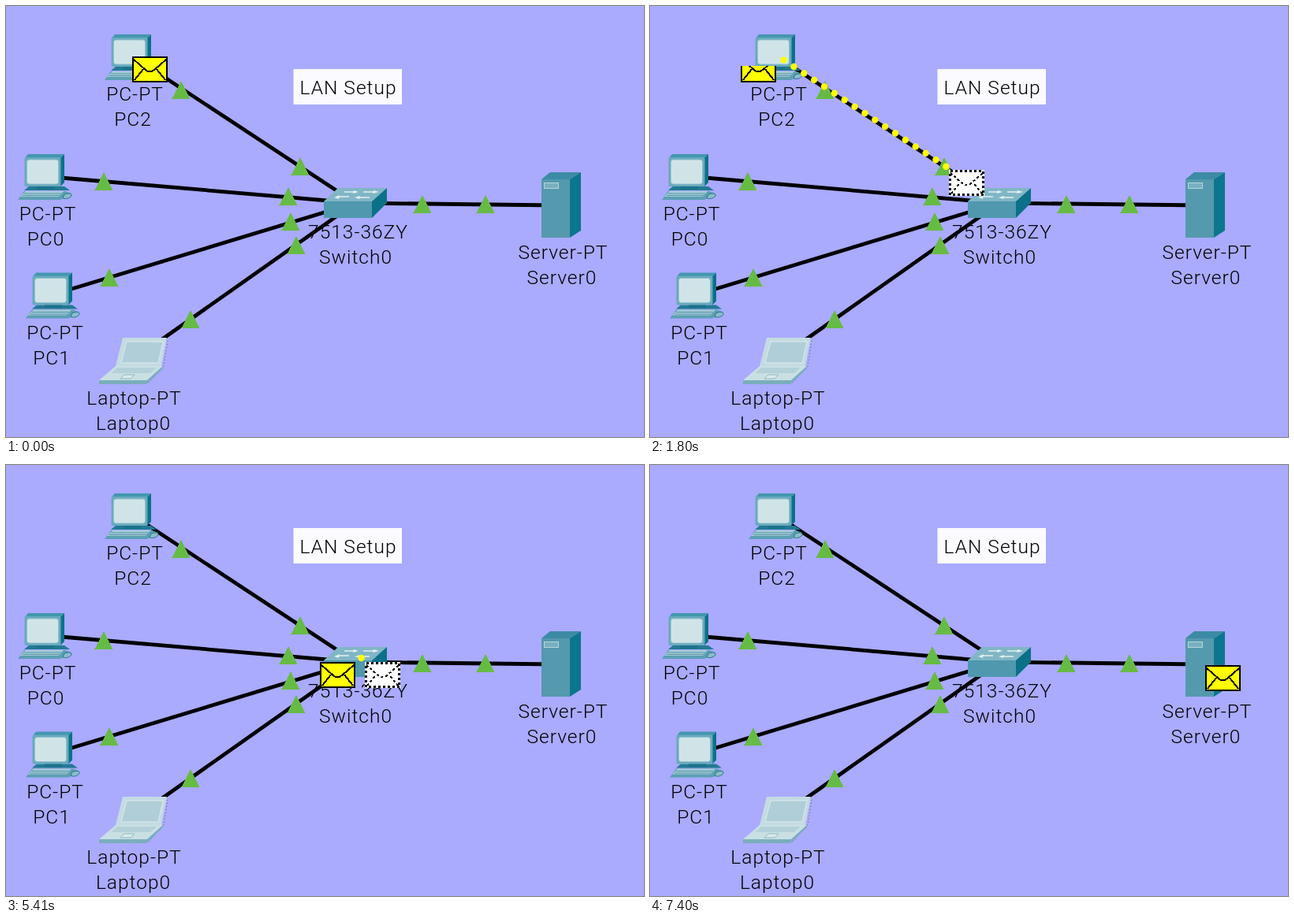
These frames come from a looping animation (809x547 px, 8 s). An HTML page:

```html
<!DOCTYPE html>
<html lang="en">
<head>
<meta charset="utf-8">
<title>LAN Setup</title>
<style>
  html, body { margin: 0; width: 100%; height: 100%; overflow: hidden; background: #aaaaff; }
  #stage { display: block; width: 809px; height: 547px; }
  text { font: 300 24.5px Roboto, "Open Sans", sans-serif; letter-spacing: 1px; text-anchor: middle; fill: #000; }
  .wire { stroke: #000; stroke-width: 4.8; }
  .led { fill: #66bb44; }
  .ink { fill: none; stroke: #000; stroke-width: 2; }
  .dash { stroke-dasharray: 3 3; }
  #leds, #mail, #ghost { shape-rendering: crispEdges; }
</style>
</head>
<body>
<svg id="stage" viewBox="0 0 809 547">
  <defs>
    <g id="pc">
      <path d="M14 41H59L66 46H8Z" fill="#227a92"/>
      <path d="M8 47H60L68 50L54 58H0Z" fill="#5c9fb3"/>
      <path d="M10 47H58L52 54H3Z" fill="#a5cad5"/>
      <path d="M8 50H55M6 52.500H53" stroke="#5496aa" fill="none"/>
      <path d="M59 51Q69 48 68 53Q64 58 57 56Z" fill="#8dbbc8" stroke="#28788e"/>
      <path d="M9 5L13 0H59L54 5Z" fill="#4397af"/>
      <path d="M54 5L59 0V36L54 41Z" fill="#0c7089"/>
      <rect x="8.500" y="4" width="46" height="37" rx="2" fill="#69aabd"/>
      <rect x="11.500" y="7" width="40" height="31" rx="3" fill="#d0e4e8" stroke="#91c0cd"/>
      <path d="M24 41H46V45H24Z" fill="#1c728a"/>
    </g>
    <path id="flap" d="M2 4L17 17Q22 22 28 17L43 4M3 30L14 16M42 30L31 16"/>
    <g id="mail">
      <rect x="1" y="1" width="43" height="31" fill="#ffff00" stroke="#000" stroke-width="2"/>
      <use href="#flap" class="ink"/>
    </g>
    <g id="ghost">
      <rect width="45" height="33" fill="#fff"/>
      <rect x="1.500" y="1.500" width="42" height="30" class="ink dash" style="stroke-width: 3"/>
      <use href="#flap" class="ink dash"/>
    </g>
  </defs>
  <rect width="809" height="547" fill="#aaaaff"/>
  <g id="wires"></g>

  <g id="labels"><rect x="364.500" y="80" width="137.500" height="45" fill="#fafaff"/></g>

  <use href="#pc" x="125" y="36"/>
  <use href="#pc" x="15" y="188"/>
  <use href="#pc" x="25" y="338.500"/>

  <g id="laptop">
    <path d="M148 421H204L197 457H139Z" fill="#c3dbe1"/>
    <path d="M153 426H199L193 453H146Z" fill="#b0ced8" stroke="#dcebed"/>
    <path d="M204 421L205 425L200 457L180 479" fill="none" stroke="#557" stroke-dasharray="1 3"/>
    <path d="M139 457H199L179 475H118Z" fill="#c9dfe3"/>
    <path d="M118 475H179L199 457V460L178 480H118Z" fill="#7aaebc"/>
    <path d="M141 459H191L183 466H133Z" fill="#b4d1d9"/>
    <path d="M150 468H163L158 473H145Z" fill="#d9e9ec" stroke="#8eb9c5"/>
  </g>

  <g id="switch">
    <path d="M403 248L421 231H483L464 248Z" fill="#80b6c5"/>
    <path d="M464 248L483 231V250L464 269Z" fill="#0b7088"/>
    <path d="M403 248H464V269H403Z" fill="#4f98ae"/>
    <path d="M429 236H443M421 242H435M453 236H468M447 243H461" stroke="#e4f0f3" stroke-width="1.500"/>
    <path d="M441 234L447 236L440 238ZM423 240L416 243L422 245ZM466 234L473 236L465 238ZM449 241L442 243L448 245Z" fill="#e4f0f3"/>
  </g>

  <g id="server">
    <path d="M679 220L690 211H729L715 220Z" fill="#3c8ba4"/>
    <path d="M715 220L729 211V285L715 294Z" fill="#0c768e"/>
    <path d="M679 220H715V294H679Z" fill="#5499ae"/>
    <rect x="682.500" y="224.500" width="18" height="7" fill="#78b0c0" stroke="#b5d5dd"/>
  </g>

  <g id="leds"></g>
  <g id="trail" fill="#ffff00"></g>
  <svg id="out" width="45"><use href="#mail"/></svg>
  <use id="moving" href="#ghost"/>
  <svg id="fill" width="45"><use href="#mail"/></svg>
</svg>
<script>
const $ = id => document.getElementById(id);

function add(parent, tag, attrs, text) {
  const el = document.createElementNS("http://www.w3.org/2000/svg", tag);
  set(el, attrs);
  if (text) el.textContent = text;
  return $(parent).appendChild(el);
}
function set(el, attrs) {
  for (const k in attrs) el.setAttribute(k, attrs[k]);
}
const show = (el, on) => set(el, { visibility: on ? "visible" : "hidden" });

for (const [x1, y1] of [[179, 76], [70, 218], [80, 360], [195, 425], [700, 253]])
  add("wires", "line", { class: "wire", x1, y1, x2: 443, y2: 250 });

for (const [x, y] of [[222, 107], [373, 204], [124, 223], [358, 242], [361, 274],
                      [131, 345], [368, 304], [234, 398], [528, 252], [608, 252]])
  add("leds", "path", { class: "led", d: `M${x} ${y - 11.5}l11.5 22h-23z` });

for (const [x, y, s] of [
  [434, 111.5, "LAN Setup"],
  [163.5, 120, "PC-PT"], [161, 152, "PC2"],
  [53, 272, "PC-PT"], [50.5, 304, "PC0"],
  [62.5, 422.5, "PC-PT"], [58, 454.5, "PC1"],
  [162.5, 506, "Laptop-PT"], [161.5, 538, "Laptop0"],
  [446.5, 294.5, "7513-36ZY"], [443.5, 326.5, "Switch0"],
  [706.5, 320.5, "Server-PT"], [705, 352.5, "Server0"]
]) add("labels", "text", { x, y }, s);

const LOOP = 8000, STEP = 66.7, HOPS = 22, H = 33;
const stops = [[160, 64], [443, 250], [704, 254]];
// start and end in ms, ticks per step, first trail dot
const trips = [
  { from: 1000, to: 3080, rate: 1.395, dot: [169.5, 68.5] },
  { from: 5410, to: 7400, rate: 1.42, dot: [450.5, 245] }
];
const dots = Array.from({ length: HOPS }, () => add("trail", "circle", { r: 4.2 }));
const out = $("out"), moving = $("moving"), fill = $("fill");

// Shows an envelope without its top `cut` pixels.
function mail(el, [x, y], cut) {
  set(el, { x, y: y + cut, height: H - cut, viewBox: `0 ${cut} 45 ${H - cut}` });
  show(el, true);
}

function rest(pos) {
  mail(fill, pos, 0);
  show(out, false);
  show(moving, false);
  dots.forEach(d => show(d, false));
}

function travel(trip, a, b, t) {
  const i = Math.floor((t - trip.from) / STEP + .1);
  const n = 1 + Math.floor(i * trip.rate);
  const dx = (b[0] - a[0]) / HOPS, dy = (b[1] - a[1]) / HOPS;
  const hop = Math.min(n, HOPS), gone = Math.max(0, n - HOPS + 1);

  dots.forEach((d, k) => {
    set(d, { cx: trip.dot[0] + dx * k, cy: trip.dot[1] + dy * k });
    show(d, k >= gone && k < hop);
  });
  set(moving, { x: Math.round(a[0] + dx * hop), y: Math.round(a[1] + dy * hop) });
  show(moving, true);

  if (n < HOPS) {
    mail(out, [a[0] - 45, a[1]], Math.floor(n * .72));
    show(fill, false);
  } else {
    show(out, false);
    mail(fill, b, H - Math.min(H, Math.ceil(gone * .75)));
  }
}

function draw(t) {
  let at = 0;
  for (const trip of trips) {
    if (t < trip.from) break;
    if (t < trip.to) return travel(trip, stops[at], stops[at + 1], t);
    at++;
  }
  rest(stops[at]);
}

const start = performance.now();
function frame() {
  draw((performance.now() - start) % LOOP);
  requestAnimationFrame(frame);
}
frame();
</script>
</body>
</html>
```
